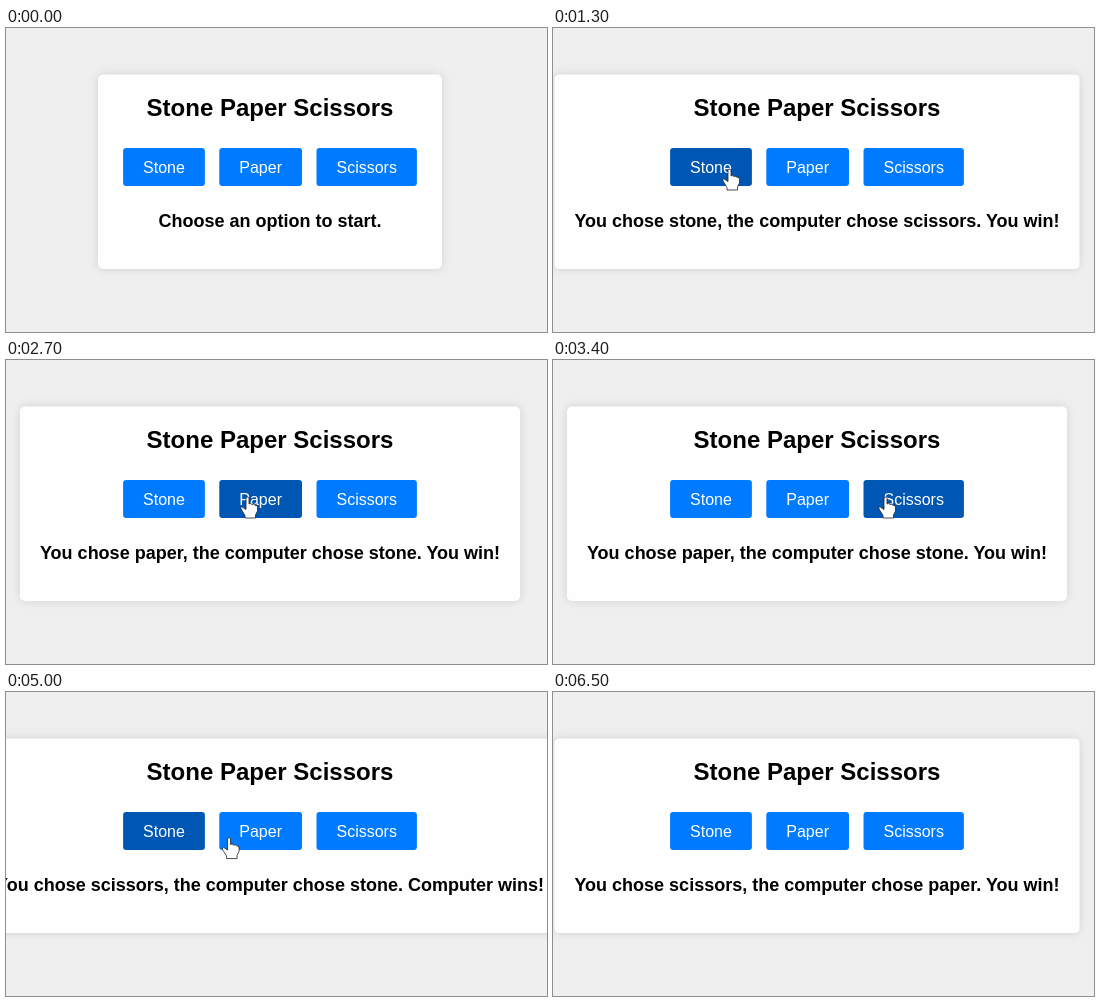
An HTML page for the animation above (7200 ms loop, 541 by 304 pixels).

```html
<!DOCTYPE html>
<html lang="en">
<head>
<meta charset="utf-8">
<title>Stone Paper Scissors</title>
<style>
  html, body { margin: 0; width: 100%; height: 100%; overflow: hidden; background: #efefef; }
  svg { display: block; width: 541px; height: 304px; }
  text { font-family: "Liberation Sans", Arial, sans-serif; text-anchor: middle; }
  #card { fill: #fefefe; filter: drop-shadow(0 0 5px rgba(0, 0, 0, .12)); }
  #title { font-size: 24px; font-weight: bold; }
  #result { font-size: 18px; font-weight: bold; }
  .button rect { fill: #007bff; }
  .button.hover rect { fill: #0056b3; }
  .button text { font-size: 16px; fill: #fff; }
  #cursor { fill: #fff; stroke: #222; stroke-width: .8; stroke-linejoin: round; }
</style>
</head>
<body>
<svg viewBox="0 0 541 304">
  <rect id="card" y="46.5" height="194.5" rx="5"/>
  <text id="title" x="264" y="88">Stone Paper Scissors</text>
  <g id="buttons"></g>
  <text id="result" x="264" y="199"></text>
  <path id="cursor"/>
</svg>
<script>
const LOOP = 7200, STEP = 100, CENTER = 264, MIN_CARD = 343.8;
const HAND = 'M-2 1.5Q-2 0-.5 0T1 1.5V7q1.5-1.5 3 .5q2-1 3 .8q2.5-.7 2.5 2V14l-2 4v3H-3v-2.5L-7 12q-.8-2.5 1-2.2L-2 12.5Z';
const ARROW = 'M0 0V16l4-3.5 2.5 6 2.5-1-2.5-6H12Z';
const SHOW = 100, HIDE = 6500;

const buttons = [
  { label: 'Stone', x: 117.1, width: 81.8 },
  { label: 'Paper', x: 213.3, width: 82.7 },
  { label: 'Scissors', x: 310.5, width: 100.4 }
];

const messages = [
  [0, 'Choose an option to start.'],
  [1300, 'You chose stone, the computer chose scissors. You win!'],
  [2700, 'You chose paper, the computer chose stone. You win!'],
  [3800, 'You chose scissors, the computer chose stone. Computer wins!'],
  [5700, "You chose paper, the computer chose paper. It's a tie!"],
  [6400, 'You chose scissors, the computer chose paper. You win!']
];

// Pointer moves: start time, end time, destination
const entry = [262, 214];
const moves = [
  [100, 700, 177, 141],
  [1500, 2000, 242, 137],
  [3000, 3400, 333, 137],
  [4000, 4800, 168, 145],
  [4800, 5400, 268, 146],
  [5700, 6200, 346, 141]
];

const get = id => document.getElementById(id);
const card = get('card'), result = get('result'), cursor = get('cursor');

get('buttons').innerHTML = buttons.map(({ label, x, width }) => `
  <g class="button">
    <rect x="${x}" y="120" width="${width}" height="38" rx="3"/>
    <text x="${x + width / 2}" y="144.5">${label}</text>
  </g>`).join('');
const buttonNodes = document.querySelectorAll('.button');

const easeOut = u => 1 - (1 - u) ** 2;

function pointerAt(time) {
  let [x, y] = entry;
  for (const [start, end, toX, toY] of moves) {
    const u = easeOut(Math.min(1, Math.max(0, (time - start) / (end - start))));
    x += (toX - x) * u;
    y += (toY - y) * u;
  }
  return [x, y];
}

function isOver(button, [x, y]) {
  return x >= button.x && x <= button.x + button.width && y >= 120 && y <= 158;
}

function showMessage(text) {
  if (result.textContent === text) return;
  result.textContent = text;
  const width = Math.max(MIN_CARD, result.getComputedTextLength() + 40);
  card.setAttribute('x', CENTER - width / 2);
  card.setAttribute('width', width);
}

function draw(time) {
  const visible = time >= SHOW && time < HIDE;
  const [x, y] = pointerAt(time);
  // Hover trails the pointer by one step
  const hoverPoint = pointerAt(time - STEP);
  let hovering = false;
  buttons.forEach((button, i) => {
    const hover = visible && isOver(button, hoverPoint);
    buttonNodes[i].classList.toggle('hover', hover);
    hovering ||= hover;
  });
  cursor.style.display = visible ? '' : 'none';
  cursor.setAttribute('d', hovering ? HAND : ARROW);
  cursor.setAttribute('transform', `translate(${x} ${y})`);
  showMessage(messages.findLast(([start]) => time >= start)[1]);
}

const origin = performance.now();
function frame() {
  const time = (performance.now() - origin) % LOOP;
  draw(Math.floor(time / STEP) * STEP);
  requestAnimationFrame(frame);
}
frame();
</script>
</body>
</html>
```
